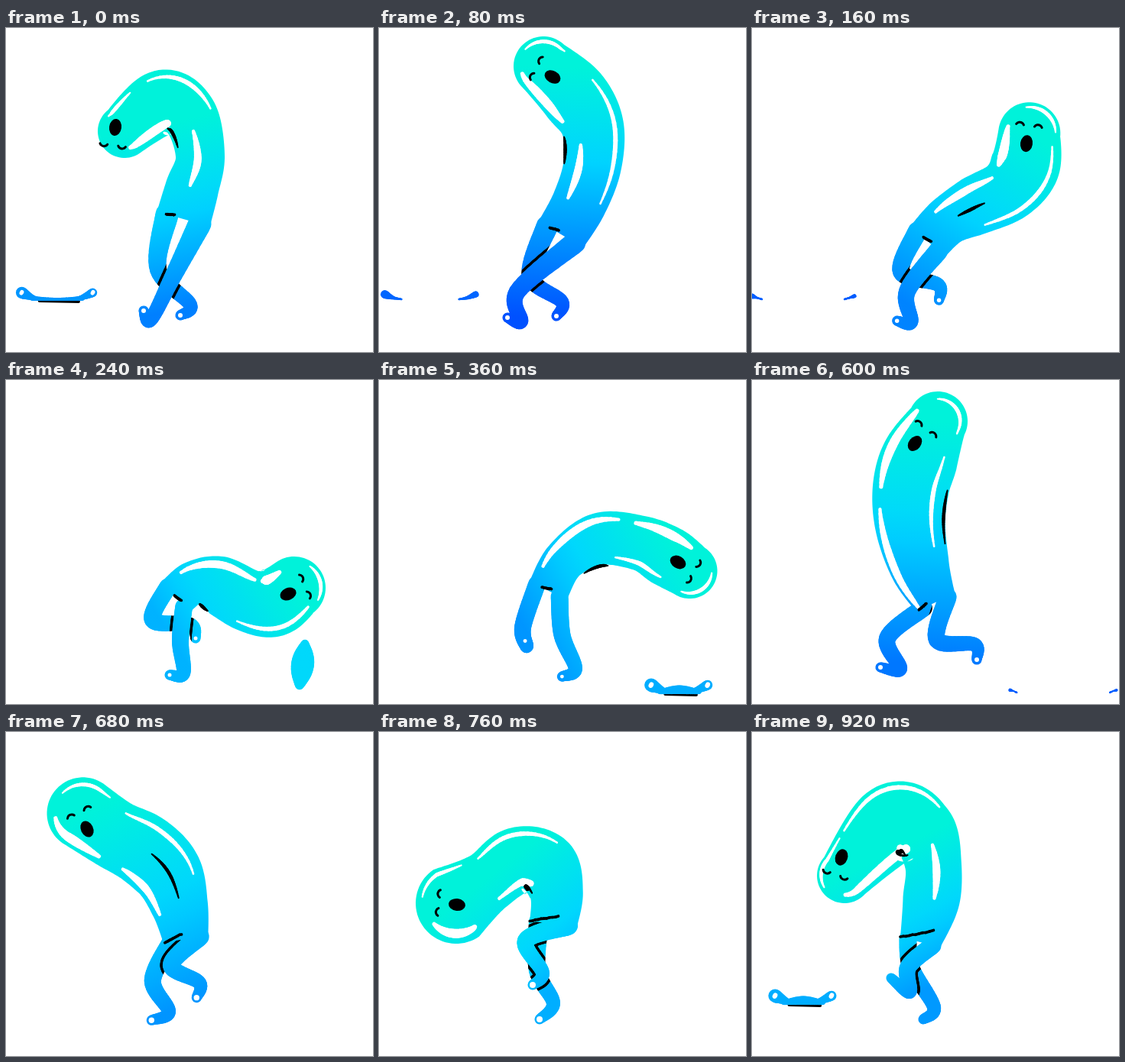
Recreate the animation shown at these times as an HTML page with a canvas. Size 480 by 424 pixels, loop 0.96 s.

```html
<!DOCTYPE html>
<html lang="en">
<head>
<meta charset="utf-8">
<title>Wobbly walk</title>
<style>
  html, body { margin: 0; width: 480px; height: 424px; overflow: hidden; background: #fff; }
  canvas { display: block; }
</style>
</head>
<body>
<canvas id="stage" width="480" height="424"></canvas>
<script>
const ctx = document.getElementById('stage').getContext('2d');
const LOOP = 960, STEP = 40, TAU = Math.PI * 2;
const HEAD = 5;      // spine index of the head; HEAD to HEAD + 1 wraps round to its tip
const DETAIL = 40;   // samples per spine section

// spine: x, y, radius from hip to head; legs: knee, heel and toe of the near, then the far leg
// streaks: four highlights and a crease as side offset and range along the spine
// fold: hip crease from side to side; face: mouth position and direction of the eyes
const poses = [
  { t: 0, hue: 210, shine: 3, fold: [-.65, -.35], face: [143, 130, 98],
    spine: [232,250,36, 243,211,35, 254,168,32, 240,115,37, 204,98,43, 155,135,35],
    legs: [217,328, 189,382, 180,370, 199,316, 241,362, 228,376],
    streaks: [.82,4.4,5.1, .78,2.9,4.1, -.65,3.8,5.2, -.1,1.1,2.6, -.85,2.3,3.2] },
  { t: 80, hue: 221, shine: 3, fold: [-.5, -.15], face: [227, 64, 208],
    spine: [238,270,34, 262,229,36, 279,180,38, 279,128,41, 255,88,45, 215,50,39],
    legs: [181,345, 186,384, 168,379, 198,325, 239,358, 232,377],
    streaks: [.83,4.8,6, .7,1.2,4, -.75,3.6,5.3, -.45,1,2.5, -.97,1.9,2.8] },
  { t: 240, hue: 198, shine: 2.5, fold: [-.1, .3], face: [369, 280, -24],
    spine: [222,284,27, 245,266,29, 277,268,38, 318,289,41, 350,291,45, 377,272,41],
    legs: [228,342, 232,384, 214,386, 192,314, 241,320, 248,338],
    streaks: [.85,5.3,6.2, .75,2.9,5, -.68,3.4,4.9, -.7,.8,2.9, .98,1,1.9] },
  { t: 480, hue: 214, shine: 2.5, fold: [-.65, -.15], face: [337, 124, 60],
    spine: [224,268,28, 224,205,29, 240,132,32, 292,97,33, 335,117,36, 344,154,32],
    legs: [246,328, 279,369, 264,387, 184,334, 149,380, 135,352],
    streaks: [.75,4.9,6.4, .65,1.7,3.3, -.7,2.2,4.2, -.7,.4,1.9, .9,1.4,2.6] },
  { t: 600, hue: 212, shine: 3, fold: [-.85, -.4], face: [213, 83, -52],
    spine: [240,291,28, 220,246,39, 207,190,46, 208,140,50, 221,98,50, 243,54,39],
    legs: [242,340, 291,346, 294,366, 177,338, 194,378, 168,376],
    streaks: [.75,4.9,6.3, .6,1.4,4.2, -.78,2.9,5, -.8,.1,2.4, .95,1.4,3.1] },
  { t: 760, hue: 199, shine: 4, fold: [-1, .15], face: [102, 226, 186],
    spine: [228,251,31, 232,212,35, 217,176,44, 180,169,44, 142,196,41, 101,224,53],
    legs: [192,273, 214,315, 201,331, 207,312, 228,355, 210,376],
    streaks: [.85,4.3,5.5, .78,2.1,3.8, -.75,4.9,5.9, -.65,1.7,4, -.85,1.2,2.5] },
  { t: 920, hue: 204, shine: 0, fold: [-1, .4], face: [117, 164, 110],
    spine: [220,275,27, 234,222,37, 237,173,37, 222,130,45, 183,121,53, 121,188,36],
    legs: [204,308, 206,340, 182,322, 208,308, 238,360, 224,376],
    streaks: [.85,4.6,5.8, .85,3.1,4.5, -.7,3.2,5.5, .1,1.1,2.5, -.85,2.4,3.9] },
];
const STREAK_WIDTHS = [2.5, 3, 6, 5, 2.2];

const mix = (a, b, k) => a + (b - a) * k;
const chunk = (list, n) => Array.from({ length: list.length / n }, (_, i) => list.slice(i * n, i * n + n));
const range = (n, f) => Array.from({ length: n + 1 }, (_, i) => f(i / n));

// Teal below hue 190, pure hues above
const tint = h => h < 190
  ? `rgb(0,${mix(244, 213, (h - 171) / 19)},${mix(216, 255, (h - 171) / 19)})`
  : `hsl(${h},100%,50%)`;

function hermite(a, b, da, db, k) {
  const k2 = k * k, k3 = k2 * k;
  return a * (2 * k3 - 3 * k2 + 1) + b * (3 * k2 - 2 * k3) + da * (k3 - 2 * k2 + k) + db * (k3 - k2);
}

function spline(pts, steps = 12) {
  const at = i => pts[Math.max(0, Math.min(pts.length - 1, i))], out = [pts[0]];
  for (let i = 0; i < pts.length - 1; i++)
    for (let s = 1; s <= steps; s++)
      out.push(pts[i].map((v, c) => hermite(v, at(i + 1)[c],
        (at(i + 1)[c] - at(i - 1)[c]) / 2, (at(i + 2)[c] - v) / 2, s / steps)));
  return out;
}

// Angles come first so that bends swing round instead of shrinking
const ANGLES = HEAD + 1;
function encode({ spine, face: [mx, my, deg], legs, streaks, fold, hue, shine }) {
  const pts = chunk(spine, 3), turn = deg * TAU / 360;
  const steps = pts.slice(1).map(([x, y], i) => [x - pts[i][0], y - pts[i][1]]);
  const dx = mx - pts[HEAD][0], dy = my - pts[HEAD][1], c = Math.cos(turn), s = Math.sin(turn);
  return [...steps.map(([x, y]) => Math.atan2(y, x)), turn, ...steps.map(p => Math.hypot(...p)),
    ...pts.map(p => p[2]), ...pts[0].slice(0, 2), dx * c + dy * s, dy * c - dx * s,
    ...fold, hue, shine, ...legs, ...streaks];
}

function decode(values) {
  const rest = [...values], take = n => rest.splice(0, n);
  const angles = take(HEAD), [turn] = take(1), lengths = take(HEAD), radii = take(HEAD + 1);
  let [x, y] = take(2);
  const spine = radii.map((r, i) => {
    if (i) {
      x += Math.cos(angles[i - 1]) * lengths[i - 1];
      y += Math.sin(angles[i - 1]) * lengths[i - 1];
    }
    return [x, y, r];
  });
  const mouth = take(2), fold = take(2), [hue, shine] = take(2);
  return { spine, turn, mouth, fold, hue, shine, legs: chunk(take(12), 2), streaks: chunk(rest, 3) };
}

const keys = poses.map(encode);
for (let k = 1; k < keys.length; k++)
  for (let i = 0; i < ANGLES; i++)
    keys[k][i] -= TAU * Math.round((keys[k][i] - keys[k - 1][i]) / TAU);

function poseAt(t) {
  const n = keys.length, i = poses.findLastIndex(p => p.t <= t);
  const time = k => poses[(k + n) % n].t + LOOP * Math.floor(k / n);
  const [p, a, b, q] = [i - 1, i, i + 1, i + 2].map(k => keys[(k + n) % n]);
  const span = time(i + 1) - time(i), k = (t - time(i)) / span;
  const da = 0.7 * span / (time(i + 1) - time(i - 1)), db = 0.7 * span / (time(i + 2) - time(i));
  return decode(a.map((v, c) => hermite(v, b[c], (b[c] - p[c]) * da, (q[c] - v) * db, k)));
}

// Maps a place along the spine (u) and across it (side, -1 to 1) to the stage
function bodyMap(spine) {
  const line = spline(spine, DETAIL), last = line.length - 1;
  return (u, side) => {
    const i = Math.max(0, Math.min(last, Math.round(u * DETAIL)));
    const [x, y, r] = line[i], from = line[Math.max(0, i - 1)], to = line[Math.min(last, i + 1)];
    const dx = to[0] - from[0], dy = to[1] - from[1], len = Math.hypot(dx, dy);
    const wrap = Math.max(0, u - HEAD) * TAU / 4;
    const across = side * r * Math.cos(wrap) / len, ahead = Math.abs(side) * r * Math.sin(wrap) / len;
    return [x - dy * across + dx * ahead, y + dx * across + dy * ahead];
  };
}

function tube(pts, style, grow = 0) {
  ctx.strokeStyle = style;
  ctx.lineCap = 'round';
  for (let i = 1; i < pts.length; i++) {
    ctx.lineWidth = Math.max(0.5, pts[i][2] + pts[i - 1][2] + 2 * grow);
    ctx.beginPath();
    ctx.moveTo(pts[i - 1][0], pts[i - 1][1]);
    ctx.lineTo(pts[i][0], pts[i][1]);
    ctx.stroke();
  }
}

function oval(x, y, rx, ry, style, turn = 0) {
  ctx.fillStyle = style;
  ctx.beginPath();
  ctx.ellipse(x, y, Math.max(0, rx), Math.max(0, ry), turn, 0, TAU);
  ctx.fill();
}

function drawFace([x, y], [ahead, aside], turn) {
  ctx.save();
  ctx.translate(x, y);
  ctx.rotate(turn);
  ctx.translate(ahead, aside);
  oval(0, 0, 11, 8, '#000');
  ctx.strokeStyle = '#000';
  ctx.lineWidth = 3;
  for (const side of [-12, 12]) {
    ctx.beginPath();
    ctx.arc(21, side, 5.5, -1.1, 1.1);
    ctx.stroke();
  }
  ctx.restore();
}

function drawWalker(t) {
  const { spine, turn, mouth, fold, hue, shine, legs, streaks } = poseAt(t);
  const body = bodyMap(spine), head = spine[HEAD], hipSize = spine[0][2] * 0.42;
  const leg = (side, joints) => spline([[...body(0, side), hipSize],
    ...joints.map((p, i) => [...p, [11, 9, 6.5][i]])]);
  const near = leg(0.62, legs.slice(0, 3)), far = leg(-0.62, legs.slice(3));
  const toes = [legs[2], legs[5]];

  const skin = ctx.createLinearGradient(head[0], head[1],
    (toes[0][0] + toes[1][0]) / 2, (toes[0][1] + toes[1][1]) / 2);
  range(8, s => skin.addColorStop(s, tint(mix(172, hue, s))));

  tube(far, skin);
  ctx.globalCompositeOperation = 'source-atop';   // the near leg outlines itself on the far one
  tube(near, '#000', 3.5);
  ctx.globalCompositeOperation = 'source-over';

  ctx.fillStyle = skin;
  ctx.beginPath();
  range(120, s => ctx.lineTo(...body(s * (HEAD + 1), -1)));
  range(120, s => ctx.lineTo(...body((1 - s) * (HEAD + 1), 1)));
  ctx.fill();
  tube(near, skin);
  for (const [x, y] of toes) oval(x, y, shine, shine, '#fff');

  streaks.forEach(([side, from, to], i) => {
    const taper = s => STREAK_WIDTHS[i] * (0.4 + 0.6 * Math.sin(s * Math.PI));
    tube(range(24, s => [...body(mix(from, to, s), side), taper(s)]), i < 4 ? '#fff' : '#000');
  });
  const rise = 0.3 * (fold[1] - fold[0]);
  tube(range(10, s => [...body(rise * s, mix(...fold, s)), 1.8]), '#000');
  drawFace(head, mouth, turn);
}

// A drop lands at age 0, then splits into two blobs that fly apart and shrink
function drawSplash(age, x, ground, drift) {
  if (age < -40 || age > 330) return;
  const colour = tint(188 + Math.max(0, Math.min(30, age * 0.14)));
  if (age < 0) {
    const y = ground + age * 0.9;
    tube(spline([[x + 3, y - 27, 5], [x, y, 15], [x - 4, y + 27, 6]]), colour);
    return;
  }
  const centre = x + drift * age, half = 8 + 70 * (1 - Math.exp(-age / 150)), size = 11 * (1 - age / 400);
  if (age < 150) {
    const bubble = 2 + Math.max(0, (110 - age) / 8);
    tube([[centre - half * 0.5, ground + 3, 2], [centre + half * 0.6, ground + 4, 2]], '#000');
    tube(spline([[centre - half * 0.7, ground, 3], [centre, ground - bubble + 3, bubble],
      [centre + half * 0.7, ground, 3]]), colour);
  }
  for (const side of [-1, 1]) {
    const tip = [centre + side * half, ground - size, size * (side < 0 ? 1 : 0.75)];
    const inner = centre + side * (half - Math.min(half, size * 4));
    tube(spline([tip, [(tip[0] + inner) / 2, ground - 1, size * 0.4], [inner, ground + 1, 1.2]]), colour);
    if (age < 200) oval(tip[0], tip[1], size * 0.35, size * 0.45, '#fff', 0.5);
  }
}

function frame(now) {
  const t = Math.floor(now % LOOP / STEP) * STEP;
  ctx.clearRect(0, 0, 480, 424);
  drawWalker(t);
  drawSplash((t < 480 ? t + LOOP : t) - 840, 67, 354, 0);
  drawSplash(t - 280, 388, 408, 0.06);
  requestAnimationFrame(frame);
}
requestAnimationFrame(frame);
</script>
</body>
</html>
```
